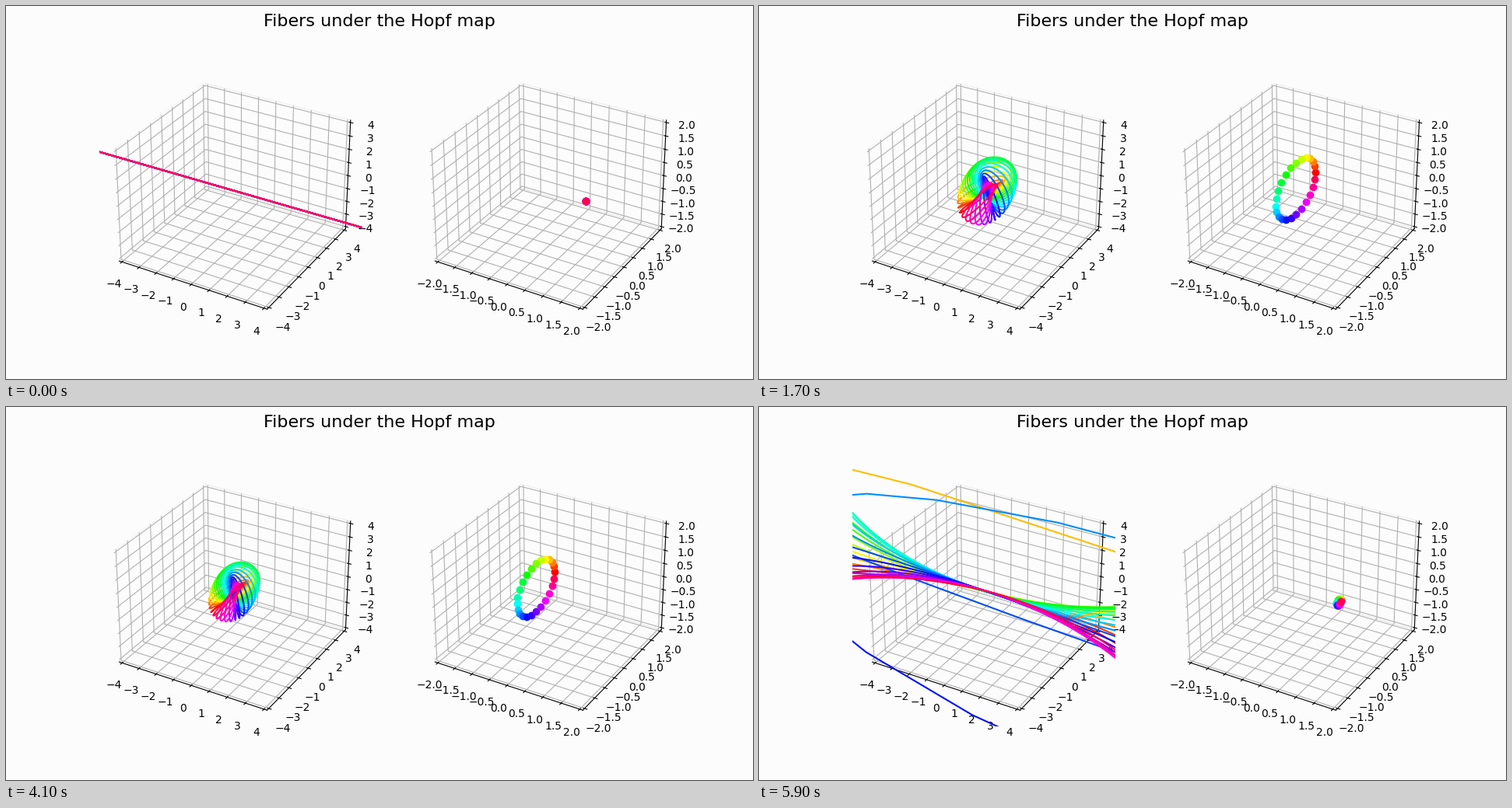
Animation of 960 by 480 pixels, one loop 6 s. Source, as a matplotlib script:

```python
import numpy as np
import matplotlib.pyplot as plt
from matplotlib.animation import FuncAnimation

FRAMES = 60
FIBERS = 24
BACKGROUND = "#fcfcfc"

phases = 2 * np.pi * np.arange(FIBERS) / FIBERS
colors = plt.get_cmap("hsv")(np.arange(FIBERS) / FIBERS)
# Angle along a fiber; zero is the point nearest the projection pole.
u = np.radians(np.arange(-180, 181))


def base_point(theta, phase):
    """Point of the unit sphere on the circle at angle theta from +x."""
    return (np.cos(theta),
            np.sin(theta) * np.cos(phase),
            np.sin(theta) * np.sin(phase))


def fiber(theta, phase):
    """Stereographic image of the Hopf fiber over a base point."""
    a, s = np.cos(theta / 2), np.sin(theta / 2)
    with np.errstate(divide="ignore", invalid="ignore"):
        scale = 1 - a * np.cos(u)
        return (a * np.sin(u) / scale,
                -s * np.cos(phase + u) / scale,
                s * np.sin(phase + u) / scale)


def make_axes(position, reach, step):
    ax = fig.add_subplot(1, 2, position, projection="3d")
    ax.set_facecolor(BACKGROUND)
    limit = reach * 25 / 24
    ticks = np.arange(-reach, reach + step / 2, step)
    for axis in (ax.xaxis, ax.yaxis, ax.zaxis):
        axis.set_ticks(ticks)
        axis.pane.fill = False
    ax.set_xlim(-limit, limit)
    ax.set_ylim(-limit, limit)
    ax.set_zlim(-limit, limit)
    return ax


fig = plt.figure(figsize=(9.6, 4.8), dpi=100, facecolor=BACKGROUND)
fig.suptitle("Fibers under the Hopf map", fontsize=16)
space = make_axes(1, 4, 1)
sphere = make_axes(2, 2, 0.5)

loops = [space.plot([], [], [], color=c)[0] for c in colors]
dots = [sphere.plot([], [], [], "o", color=c)[0] for c in colors]


def draw(frame):
    # Sweep from +x to -x and back again.
    theta = 2 * np.pi * min(frame, FRAMES - frame) / FRAMES
    for loop, dot, phase in zip(loops, dots, phases):
        loop.set_data_3d(*fiber(theta, phase))
        dot.set_data_3d(*([v] for v in base_point(theta, phase)))
    return loops + dots


anim = FuncAnimation(fig, draw, frames=FRAMES, interval=100,
                     repeat=True, repeat_delay=0)
plt.show()
```
